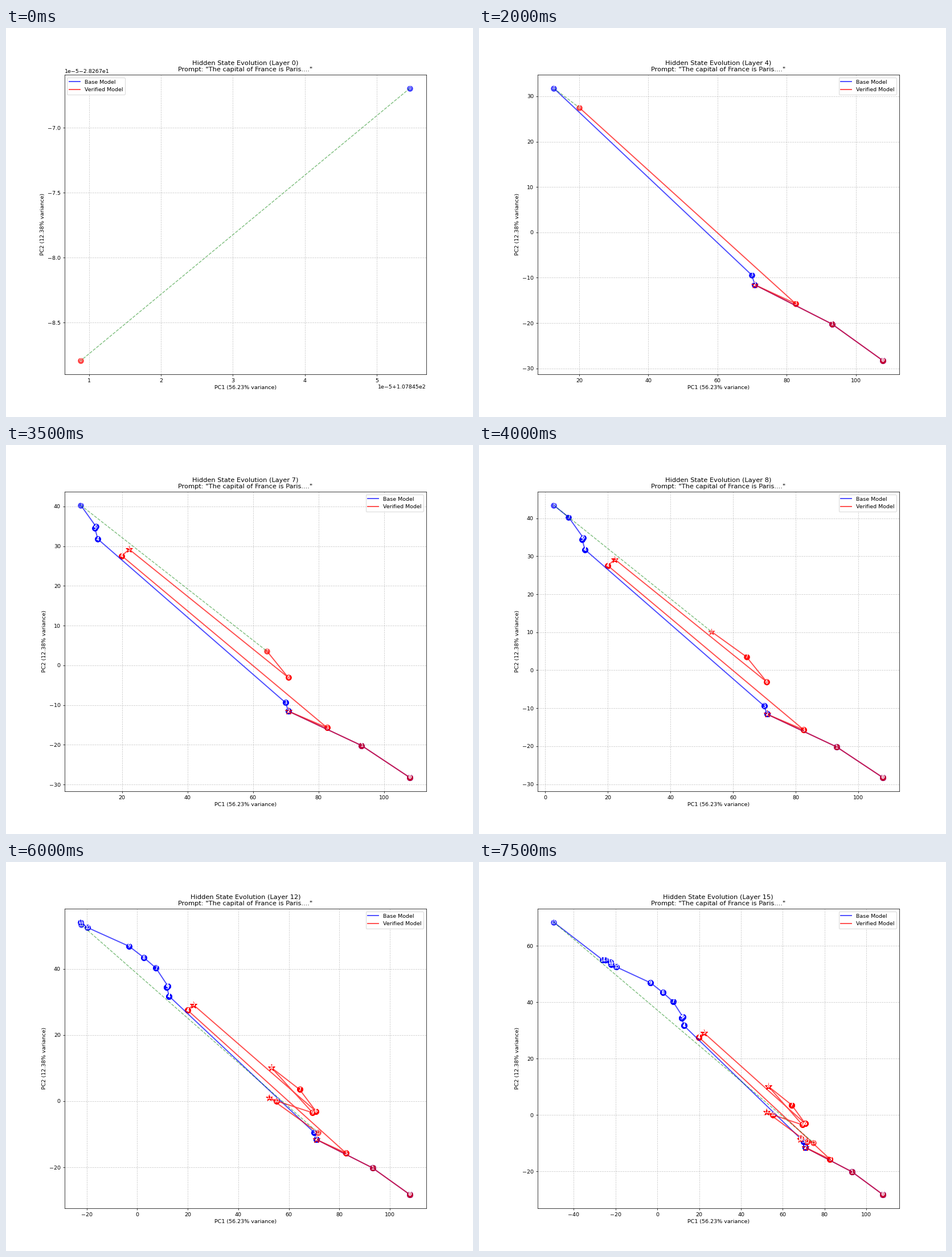
Animation, 820 px wide and 683 px high, one loop 8000 ms. Source, as a matplotlib script:

```python
import numpy as np
import matplotlib.pyplot as plt
from matplotlib.animation import FuncAnimation

W, H = 820, 683
DPI = W / 12
LAYERS = 16
STEP_MS = 500

# First three layers nearly coincide for both models.
SHARED = [(93.09, -20.19), (70.8, -11.55)]

BASE = np.array(
    [(107.845 + 5.462e-5, -28.267 - 6.695e-5)] + SHARED + [
        (69.92, -9.41), (12.65, 31.77), (11.75, 34.45), (12.1, 34.9),
        (7.46, 40.27), (2.71, 43.43), (-3.2, 46.9), (-19.67, 52.57),
        (-22.28, 54.15), (-22.15, 53.45), (-24.9, 55.05), (-26.05, 55.0),
        (-49.5, 68.4)])

VERIFIED = np.array(
    [(107.845 + 0.884e-5, -28.267 - 8.792e-5)] + SHARED + [
        (82.58, -15.69), (19.97, 27.54), (22.2, 29.2), (70.75, -3.08),
        (64.25, 3.55), (53.1, 10.15), (69.4, -3.5), (55.2, 0.06),
        (52.2, 1.1), (71.5, -9.5), (68.7, -8.3), (68.3, -8.7),
        (74.7, -9.85)])

# Every third layer of the verified model is a checkpoint, shown as a star.
STAR = np.arange(LAYERS) % 3 == 2

fig, ax = plt.subplots(figsize=(12, H / DPI), dpi=DPI)


def markers(pts, color, shape="o", size=100):
    if len(pts):
        ax.scatter(pts[:, 0], pts[:, 1], s=size, c=color, marker=shape,
                   alpha=0.7)


def labels(pts):
    for i, (x, y) in enumerate(pts):
        ax.text(x, y, str(i), color="white", fontsize=8,
                ha="center", va="center")


def update(layer):
    ax.clear()
    n = layer + 1
    ax.plot(*BASE[:n].T, "b-", lw=2, alpha=0.7, label="Base Model")
    ax.plot(*VERIFIED[:n].T, "r-", lw=2, alpha=0.7, label="Verified Model")
    ax.plot(*np.array([BASE[layer], VERIFIED[layer]]).T, "g--", alpha=0.5)

    # Each step lays one more translucent coat on all points reached so far.
    for m in range(1, n + 1):
        star = STAR[:m]
        markers(BASE[:m], "blue")
        markers(VERIFIED[:m][~star], "red")
        markers(VERIFIED[:m][star], "red", "*", 150)
        labels(BASE[:m])
        labels(VERIFIED[:m])

    ax.set_title(f"Hidden State Evolution (Layer {layer})\n"
                 'Prompt: "The capital of France is Paris...."')
    ax.set_xlabel("PC1 (56.23% variance)")
    ax.set_ylabel("PC2 (12.38% variance)")
    ax.grid(True, linestyle="--", alpha=0.7)
    ax.legend(loc="upper left" if layer == 0 else "upper right")
    return []


anim = FuncAnimation(fig, update, frames=LAYERS, init_func=lambda: [],
                     interval=STEP_MS, repeat=True, repeat_delay=0)
plt.show()
```
